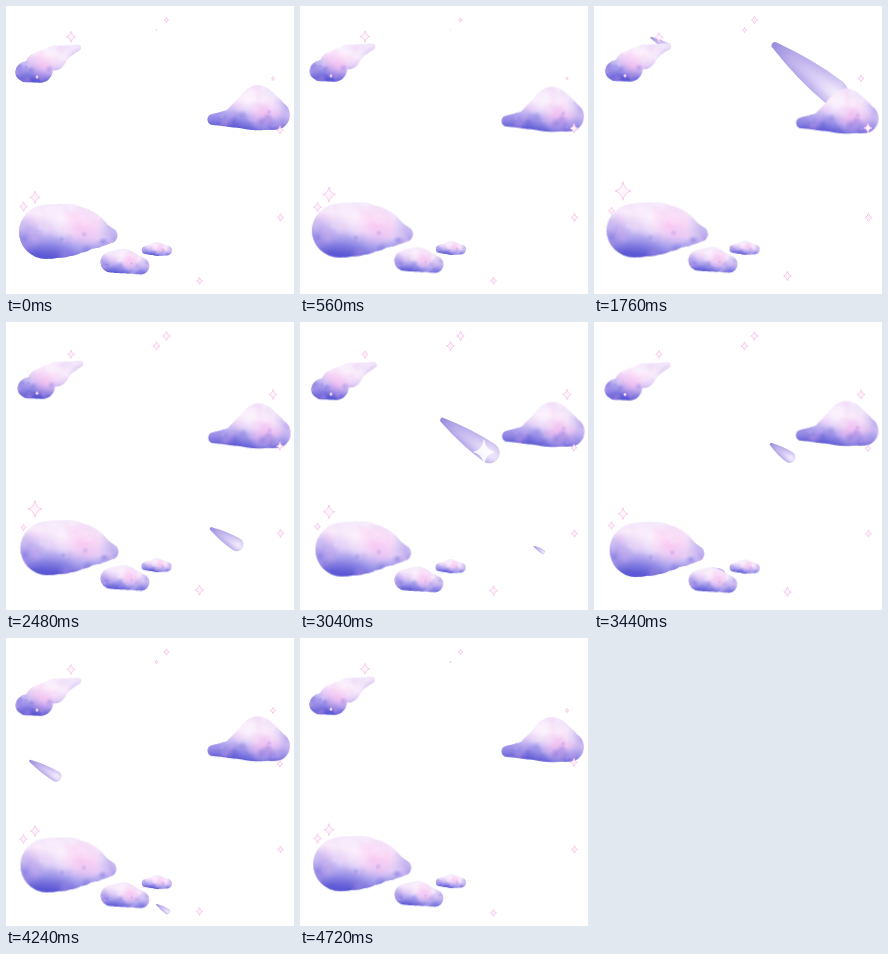
An HTML page with a canvas that plays this animation: 288x288 px, repeating every 4800 ms.

```html
<!DOCTYPE html>
<html lang="en">
<head>
<meta charset="utf-8">
<title>Dream clouds</title>
<style>
  html, body { margin: 0; width: 100%; height: 100%; overflow: hidden; background: #fff; }
  canvas { display: block; width: 100vw; height: 100vh; }
</style>
</head>
<body>
<canvas id="stage" width="288" height="288"></canvas>
<script>
const SIZE = 288, LOOP = 4800, STEP = 80;
const WHITE = '255,248,255', PINK = '250,190,240', LILAC = '164,146,232', BLUE = '88,82,212';
const ctx = document.getElementById('stage').getContext('2d');

let seed = 7;
const rand = () => (seed = (seed * 16807) % 2147483647) / 2147483647;
const clamp = v => Math.max(0, Math.min(1, v));

function ramp(c, x0, y0, x1, y1, stops) {
  const g = c.createLinearGradient(x0, y0, x1, y1);
  stops.forEach(([at, color]) => g.addColorStop(at, color));
  return g;
}

function glow(c, x, y, r, rgb, alpha) {
  const g = c.createRadialGradient(x, y, 0, x, y, r);
  g.addColorStop(0, `rgba(${rgb},${alpha})`);
  g.addColorStop(1, `rgba(${rgb},0)`);
  c.fillStyle = g;
  c.fillRect(x - r, y - r, 2 * r, 2 * r);
}

// Sweeps slightly uneven circles along a chain of [x, y, radius] puffs.
function sweep(puffs) {
  const path = new Path2D(), steps = 12;
  for (let i = 0; i + 1 < puffs.length; i++) {
    for (let k = 0; k <= steps; k++) {
      const [x, y, r] = puffs[i].map((v, j) => v + (puffs[i + 1][j] - v) * k / steps);
      const size = r * (.97 + rand() * .06);
      path.moveTo(x + size, y);
      path.arc(x, y, size, 0, 2 * Math.PI);
    }
  }
  return path;
}

// Paints a cloud once, lit from above, with a pink blush at the given point.
function cloud(puffs, blush, drift) {
  const image = document.createElement('canvas');
  image.width = image.height = SIZE;
  const c = image.getContext('2d');
  const left = Math.min(...puffs.map(([x, , r]) => x - r));
  const right = Math.max(...puffs.map(([x, , r]) => x + r));
  const top = Math.min(...puffs.map(([, y, r]) => y - r));
  const bottom = Math.max(...puffs.map(([, y, r]) => y + r));
  const w = right - left, h = bottom - top, cx = left + w / 2;
  c.clip(sweep(puffs));
  c.fillStyle = ramp(c, cx + h * .1, top, cx - h * .1, bottom,
    [[0, '#f0e4fa'], [.3, '#f8e9fb'], [.52, '#e2cff7'], [.76, '#a9a0ed'], [1, '#5f5cd4']]);
  c.fillRect(0, 0, SIZE, SIZE);
  glow(c, left, top + h * .6, h * .45, LILAC, .8);
  glow(c, right, top + h * .45, h * .4, LILAC, .8);
  glow(c, left + w * .35, bottom, h * .45, BLUE, .5);
  glow(c, right - w * .1, bottom, h * .4, BLUE, .5);
  glow(c, cx, top + h * .3, h * .42, WHITE, .7);
  glow(c, ...blush, h * .4, PINK, .75);
  for (let i = 0; i < 60; i++) {
    const depth = rand(), tints = depth < .55 ? [WHITE, PINK, WHITE] : [LILAC, BLUE, PINK];
    glow(c, left + rand() * w, top + depth * h, h * (.05 + rand() * .11), tints[i % 3], .22);
  }
  return { image, drift, cx };
}

// drift: [sway, lift, dip, stretch]
const clouds = [
  cloud([[19, 66, 10], [34, 64, 12.5], [31, 58, 11], [48, 52, 12], [57, 47, 7.5], [72, 41.5, 3]],
    [37, 60], [1.1, -1.6, 0, 0]),
  cloud([[207, 113.5, 5.5], [226, 112, 9], [252, 98, 18.5], [269, 109, 14.5], [248, 110, 14], [226, 112, 9]],
    [258, 108], [.4, 1.8, 1.2, 0]),
  cloud([[40, 226, 27], [62, 224, 26], [80, 224, 20], [92, 228, 13], [104, 229.5, 7.5]],
    [76, 219], [.6, -2.1, 0, .04]),
  cloud([[105, 256, 10.5], [118, 255, 12], [135, 260, 8.5]], [124, 254], [0, -2.4, 0, .01]),
  cloud([[140, 244, 4], [151, 243, 6.8], [161, 244.5, 5]], [154, 242], [-.2, -1.6, 0, 0])
];

// x, y, size, twinkle, float, phase
const stars = [
  [65, 31.5, 4.8, 1, 1, .8],
  [160.5, 14, 3.5, 1.2, 0, 3.7],
  [150.5, 24, 2.4, 2.2, 0, 3.8],
  [267, 72.5, 3.4, 1.7, 0, 3.8],
  [274, 124, 4.1, .9, 2.5, 1.6],
  [274.5, 211.5, 3.9, .5, 0, 2],
  [193.5, 271.5, 4.3, .8, 3.5, 3.4],
  [29, 189, 7.3, 2, 4, 2.2],
  [17.5, 203, 4, .7, 2.5, 0]
];

// x, y, length, start time
const comets = [
  [74, 192, 75, 615],
  [169, 30, 105, 1090],
  [56, 31, 25, 1360],
  [204, 206, 48, 2160],
  [138, 95, 76, 2520],
  [118, 246, 54, 3350],
  [21, 121, 40, 3750]
];

function drawCloud({ image, drift: [sway, lift, dip, stretch], cx }, a) {
  const swing = 1 - Math.cos(a), wave = Math.sin(a);
  ctx.save();
  ctx.translate(cx + sway * swing, lift * wave + dip * swing);
  ctx.scale(1 + stretch * wave, 1);
  ctx.drawImage(image, -cx, 0);
  ctx.restore();
}

function drawStar(x, y, r, stroke = '#f8c0e6', fill = '#fff6fd') {
  const k = r * .15, w = r * .85;
  ctx.beginPath();
  ctx.moveTo(x, y - r);
  ctx.quadraticCurveTo(x + k, y - k, x + w, y);
  ctx.quadraticCurveTo(x + k, y + k, x, y + r);
  ctx.quadraticCurveTo(x - k, y + k, x - w, y);
  ctx.quadraticCurveTo(x - k, y - k, x, y - r);
  ctx.fillStyle = fill;
  ctx.fill();
  ctx.lineWidth = .8;
  ctx.strokeStyle = stroke;
  ctx.stroke();
}

// The head races ahead, then the tail catches up; longer paths are wider, slower and steeper.
function drawComet([x, y, reach, start], t) {
  const p = (t - start) / (800 + reach * 3.6);
  if (p <= 0 || p >= 1) return;
  const head = 1 - (1 - clamp(p / .6)) ** 2, tail = clamp((p - .35) / .65) ** 2;
  const len = reach * (head - tail);
  if (len < 1) return;
  const r = Math.min(reach * .14, len * .3) * (1 - .6 * tail), c = len - r;
  ctx.save();
  ctx.translate(x, y);
  ctx.rotate(.45 + reach * .0021);
  ctx.translate(reach * tail, 0);
  ctx.beginPath();
  ctx.arc(r * .25, 0, r * .25, Math.PI / 2, -Math.PI / 2);
  ctx.quadraticCurveTo(c * .55, -r * .95, c, -r);
  ctx.arc(c, 0, r, -Math.PI / 2, Math.PI / 2);
  ctx.quadraticCurveTo(c * .55, r * .95, r * .25, r * .25);
  ctx.fillStyle = ramp(ctx, 0, 0, len, 0,
    [[0, '#968bdd'], [.25, '#bcafea'], [.6, '#d9cdf5'], [.85, '#f1e9fc'], [1, '#e6dbf9']]);
  ctx.fill();
  ctx.fillStyle = ramp(ctx, 0, -r, 0, r,
    [[0, 'rgba(130,112,214,.3)'], [.4, 'rgba(130,112,214,0)'], [.6, 'rgba(130,112,214,0)'], [1, 'rgba(120,104,220,.4)']]);
  ctx.fill();
  ctx.restore();
}

function draw(t) {
  const a = 2 * Math.PI * t / LOOP;
  ctx.fillStyle = '#fff';
  ctx.fillRect(0, 0, SIZE, SIZE);
  comets.forEach(c => drawComet(c, t));
  clouds.forEach(c => drawCloud(c, a));
  stars.forEach(([x, y, size, twinkle, float, phase]) => {
    const beat = Math.cos(a - phase);
    drawStar(x, y - float * beat, size + twinkle * beat);
  });
  drawStar(31, 71 - 1.6 * Math.sin(a), 1.6, '#f7c9ee', '#fff');

  // A glint rides on the fifth comet while it is near full length.
  const glint = Math.sin(Math.PI * clamp((t - 2640) / 800));
  if (glint > 0) drawStar(184, 130, 12 * glint, 'rgba(255,255,255,.6)', 'rgba(255,255,255,.85)');
}

function tick() {
  draw(Math.floor((performance.now() % LOOP) / STEP) * STEP);
  requestAnimationFrame(tick);
}
tick();
</script>
</body>
</html>
```
